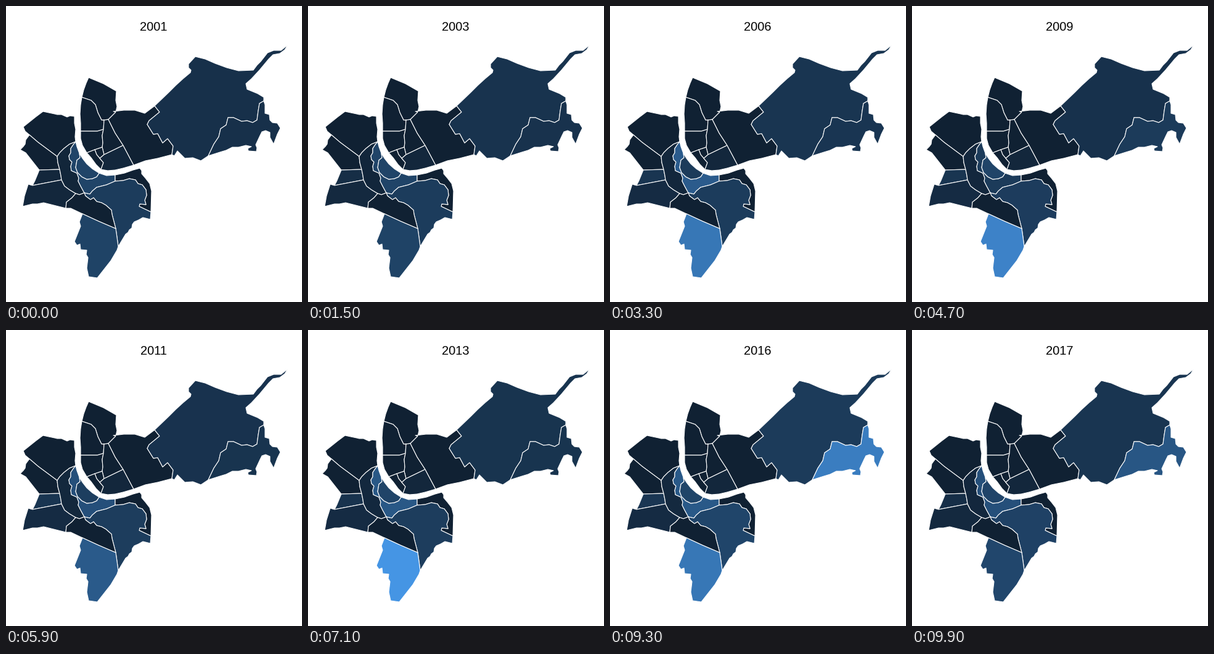
A matplotlib script that plays this animation: 480x480 px, repeating every 10000 ms.

```python
import numpy as np
import matplotlib.pyplot as plt
from matplotlib.animation import FuncAnimation
from matplotlib.patches import Polygon

SIZE, DPI = 480, 100
FRAMES, INTERVAL = 100, 100
FIRST, LAST = 2001, 2017
PERIOD = 6                       # frames per year
LOW = np.array([16, 33, 51]) / 255
HIGH = np.array([69, 149, 228]) / 255


def join(*arcs):
    """Chain arcs into one ring."""
    return [p for arc in arcs for p in arc]


def back(arc):
    return arc[::-1]


# River banks, cut where district borders meet them
west_bank_a = [(111, 179), (111, 190), (113, 200), (112, 212), (113, 220)]
west_bank_b = [(113, 220), (115, 228), (119, 239)]
west_bank_c = [(119, 239), (124, 247), (131, 256), (140, 264), (151, 271)]
west_bank_d = [(151, 271), (163, 275), (177, 274)]
west_bank_e = [(177, 274), (192, 271), (206, 266), (217, 263)]
east_bank_a = [(123, 148), (121, 160), (120, 175), (121, 190), (121, 203)]
east_bank_b = [(121, 203), (121, 215), (124, 226), (131, 238)]
east_bank_c = [(131, 238), (138, 246), (146, 257), (154, 265)]
east_bank_d = [(154, 265), (165, 267), (177, 266), (190, 263), (207, 258)]
east_bank_e = [(207, 258), (226, 251), (246, 247), (269, 241)]

# Borders west of the river
nw_line = [(28, 196), (31, 203), (38, 209), (52, 221), (83, 244)]
belt_a = [(113, 220), (103, 224), (94, 231), (87, 238), (83, 244)]
belt_b = [(83, 244), (84, 254), (87, 265)]
belt_c = [(87, 265), (89, 275), (90, 282)]
belt_d = [(90, 282), (95, 292), (103, 298), (113, 304)]
strip_top = [(54, 266), (87, 265)]
strip_low = [(43, 291), (90, 282)]
ring_west = [(113, 220), (109, 225), (105, 231), (105, 238), (102, 243),
             (103, 249), (107, 253), (105, 260), (106, 267), (115, 271),
             (118, 279), (117, 284), (121, 292), (127, 303)]
ring_low = [(127, 303), (136, 305), (140, 300), (147, 294), (163, 290),
            (177, 284)]
core_line = [(119, 239), (120, 246), (115, 250), (113, 262), (116, 270),
             (123, 277), (131, 281), (140, 280), (147, 277), (151, 271)]
bulge = [(177, 284), (190, 283), (200, 280), (210, 282), (214, 288),
         (221, 290), (227, 298), (228, 307), (225, 315), (227, 322),
         (217, 321), (216, 325), (235, 334)]
rail = [(127, 303), (129, 308), (137, 314), (142, 311), (147, 317),
        (155, 319), (162, 323), (171, 331), (172, 338), (178, 361)]
foot = [(113, 304), (107, 311), (98, 318), (97, 328)]
south_top = [(124, 337), (150, 349), (178, 361)]
south_side = [(178, 361), (180, 375), (182, 390)]

# Borders east of the river
north_line = [(123, 148), (138, 153), (145, 160), (149, 173), (155, 185)]
mid_line = [(121, 203), (148, 203), (158, 200)]
spine_a = [(159, 185), (158, 200)]
spine_b = [(158, 200), (156, 210), (157, 222), (156, 229)]
long_line = [(166, 184), (177, 206), (190, 226)]
forest_line = [(241, 162), (249, 172), (232, 186), (229, 192), (239, 208),
               (246, 207), (254, 222), (262, 215), (271, 227), (269, 241)]
east_line = [(418, 154), (411, 158), (409, 170), (407, 185), (400, 189),
             (391, 186), (382, 187), (369, 181), (360, 181), (357, 193),
             (348, 199), (345, 212), (337, 224), (328, 243)]

# Outer edge of the two eastern communes
ne_top = [(241, 162), (264, 140), (275, 129), (287, 118), (299, 108),
          (300, 104), (296, 100), (296, 94), (307, 82), (323, 86),
          (339, 93), (358, 100), (377, 105), (401, 104), (407, 96),
          (413, 90), (424, 76), (434, 72), (446, 72), (457, 63)]
ne_tail = [(457, 63), (452, 71), (444, 77), (433, 79), (426, 86), (416, 98),
           (411, 104), (398, 118), (389, 126), (391, 135), (408, 142),
           (418, 148), (418, 154)]
ne_low = [(328, 243), (316, 251), (303, 246), (290, 247), (278, 235),
          (273, 243), (269, 241)]
far_edge = [(418, 154), (420, 160), (420, 174), (427, 176), (428, 185),
            (432, 189), (440, 190), (445, 198), (440, 208), (434, 224),
            (428, 213), (428, 205), (421, 202), (415, 204), (412, 210),
            (405, 225), (407, 230), (406, 236), (393, 235), (392, 231),
            (398, 228), (389, 226), (377, 229), (367, 229), (357, 234),
            (347, 237), (328, 243)]

SHAPES = {}
SHAPES["northwest"] = join(
    west_bank_a, belt_a, back(nw_line),
    [(43, 184), (48, 180), (60, 171), (79, 175), (83, 176), (90, 176),
     (99, 180), (104, 178)])
SHAPES["west"] = join(
    nw_line[2:], belt_b, back(strip_top),
    [(32, 238), (23, 233), (28, 228), (31, 224), (32, 217)])
SHAPES["strip"] = join(strip_top, belt_c, back(strip_low), [(47, 283)])
SHAPES["southwest"] = join(
    strip_low, belt_d, foot,
    [(61, 319), (51, 321), (43, 321), (27, 325), (30, 308), (36, 289)])
SHAPES["belt"] = join(belt_a, belt_b, belt_c, belt_d, [(119, 306)],
                      back(ring_west))
SHAPES["ring"] = join(west_bank_b, core_line, west_bank_d, back(ring_low),
                      back(ring_west))
SHAPES["core"] = join(west_bank_c, back(core_line))
SHAPES["southeast"] = join(
    west_bank_e,
    [(220, 267), (220, 272), (226, 279), (233, 288), (236, 300)],
    back(bulge))
SHAPES["hill"] = join(
    ring_low, bulge,
    [(234, 346), (222, 343), (215, 347), (208, 350), (205, 354), (204, 360),
     (200, 363), (198, 367), (194, 370)],
    back(south_side), back(rail))
SHAPES["yards"] = join([(113, 304), (119, 306)], rail, back(south_top),
                       [(105, 328)], back(foot))
SHAPES["south"] = join(
    south_top, south_side,
    [(180, 396), (170, 413), (148, 441), (134, 439), (131, 425), (133, 408),
     (130, 403), (131, 396), (121, 395), (120, 386), (115, 388), (111, 382),
     (121, 357), (119, 350)])
SHAPES["port"] = join(
    north_line,
    [(159, 185), (166, 184), (178, 172), (180, 163), (178, 153), (179, 138),
     (158, 126), (134, 116), (130, 125), (126, 136)])
SHAPES["bank"] = join(north_line, spine_a, back(mid_line), back(east_bank_a))
SHAPES["quay"] = join(mid_line, spine_b, [(144, 233)], back(east_bank_b))
SHAPES["fair"] = join(spine_a, spine_b, [(159, 241)], back(long_line))
SHAPES["nook"] = [(144, 233), (156, 229), (159, 241), (152, 247), (147, 241)]
SHAPES["bridge"] = join(
    east_bank_c, [(158, 254), (152, 247), (147, 241), (144, 233)])
SHAPES["meadow"] = join(
    east_bank_d, [(190, 226), (159, 241), (152, 247), (158, 254)])
SHAPES["forest"] = join(
    long_line, east_bank_e, back(forest_line),
    [(225, 174), (209, 169), (191, 169), (174, 171), (178, 172)])
SHAPES["northeast"] = join(ne_top, ne_tail, east_line, ne_low,
                           back(forest_line))
SHAPES["east"] = join(far_edge, back(east_line))

# Level 0..1 per district: key years and values
LEVELS = {
    "core": ([2003, 2004, 2005, 2007, 2009, 2011, 2013, 2017],
             [.30, .16, .16, .28, .30, .25, .30, .31]),
    "ring": ([2004, 2005, 2006, 2007, 2009, 2011, 2013, 2014, 2015, 2017],
             [.30, .73, .50, .22, .22, .40, .47, .38, .46, .50]),
    "south": ([2004, 2005, 2006, 2007, 2008, 2009, 2011, 2013, 2014, 2016,
               2017],
              [.29, .49, .74, .74, .82, .84, .49, 1, .82, .74, .35]),
    "hill": ([2001, 2013, 2016, 2017], [.23, .24, .31, .33]),
    "northeast": ([2001, 2005, 2009, 2013, 2016, 2017],
                  [.13, .18, .14, .16, .22, .21]),
    "east": ([2001, 2005, 2009, 2011, 2014, 2015, 2017],
             [.13, .16, .22, .16, .16, .81, .78]),
    "strip": ([2001, 2005, 2011, 2015, 2016, 2017],
              [.05, .17, .17, .14, .18, .18]),
    "southwest": ([2001, 2005, 2017], [.05, .09, .09]),
    "belt": ([2001, 2017], [.04, .07]),
    "meadow": ([2001, 2017], [.05, .05]),
}


def level(name, year):
    return np.interp(year, *LEVELS[name]) if name in LEVELS else 0.0


def shade(t):
    return LOW + (HIGH - LOW) * t


def state(frame):
    """Year shown, the next year, and the blend between them."""
    step = min((frame + 1) // PERIOD, LAST - FIRST)
    year = FIRST + step
    if frame == FRAMES - 1:
        return year, FIRST, 0.5
    if year < LAST and (frame + 2) % PERIOD == 0:
        return year, year + 1, 0.5
    return year, year, 0.0


fig = plt.figure(figsize=(SIZE / DPI, SIZE / DPI), dpi=DPI, facecolor="white")
ax = fig.add_axes([0, 0, 1, 1])
ax.set_xlim(0, SIZE)
ax.set_ylim(SIZE, 0)
ax.axis("off")

areas = {}
for name, points in SHAPES.items():
    areas[name] = ax.add_patch(Polygon(
        points, closed=True, edgecolor="white", linewidth=1.1 * 72 / DPI,
        joinstyle="round"))
title = ax.text(239.5, 40, "", ha="center", va="baseline", color="black",
                family="Liberation Sans", fontsize=20 * 72 / DPI)


def draw(frame):
    year, nxt, mix = state(frame)
    title.set_text(str(year))
    for name, area in areas.items():
        t = (1 - mix) * level(name, year) + mix * level(name, nxt)
        area.set_facecolor(shade(t))
    return [*areas.values(), title]


anim = FuncAnimation(fig, draw, frames=FRAMES, interval=INTERVAL, repeat=True,
                     repeat_delay=0, blit=False)
plt.show()
```
